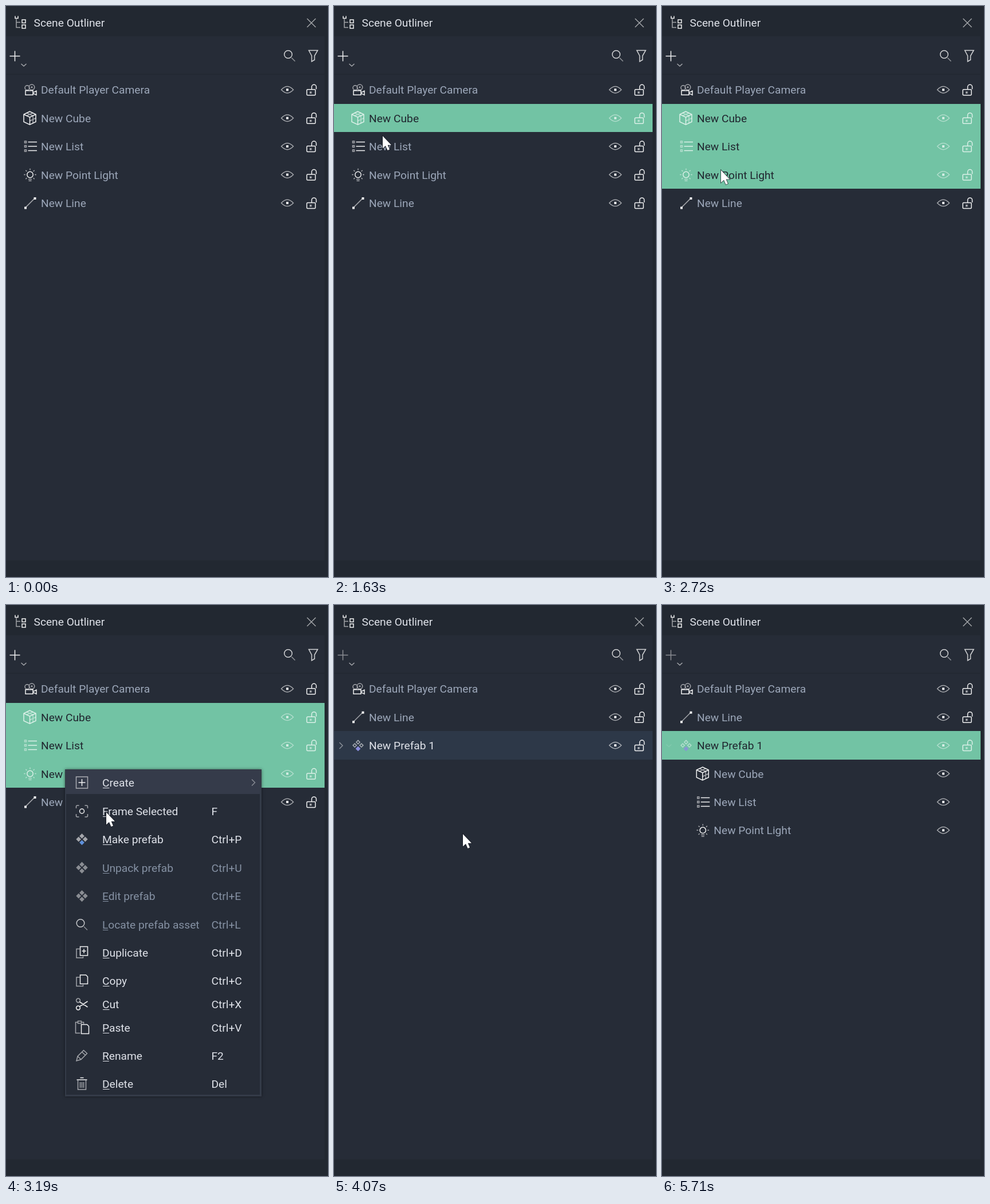
Write an HTML page with a canvas that moves like this. It is 562x997 px and loops after 5880 ms.

```html
<!DOCTYPE html>
<html lang="en">
<head>
<meta charset="utf-8">
<title>Scene Outliner</title>
<style>
html, body { margin: 0; width: 100%; height: 100%; overflow: hidden; background: #222831; }
canvas { display: block; width: 562px; height: 997px; }
</style>
</head>
<body>
<canvas id="stage" width="562" height="997"></canvas>
<script>
const ctx = document.getElementById('stage').getContext('2d');
const LOOP = 5880;
const FONT = '19.2px Roboto, sans-serif';
const PANEL = '#262c37', HOVER = '#353b4a', PICKED = '#72c3a4', FOCUS = '#2d3848';
const BRIGHT = '#dfe2e9', DIM = '#9ca7b9', OFF = '#8591a3', DARK = '#20262f';
const WHITE = 'rgba(255,255,255,.93)', GREY = 'rgba(255,255,255,.58)';

const circle = (x, y, r) => `M${x - r} ${y}a${r} ${r} 0 1 0 ${2 * r} 0a${r} ${r} 0 1 0 ${-2 * r} 0Z`;
const box = (x, y, w, h) => `M${x} ${y}h${w}v${h}h${-w}Z`;
const diamond = (x, y, r) => `M${x} ${y - r}l${r} ${r}l${-r} ${r}l${-r} ${-r}Z`;
const rays = [0, 45, 135, 180, 225, 270, 315].map(a => {
  const c = Math.cos(a * Math.PI / 180), s = Math.sin(a * Math.PI / 180);
  return `M${c * 8} ${s * 8}L${c * 10.8} ${s * 10.8}`;
}).join('');
const prefabTop = r => diamond(0, -5.6, r) + diamond(-5.8, 0, r) + diamond(5.8, 0, r);

// Paths relative to the icon centre: grey/white strokes, greyFill/whiteFill areas, tint
const ICONS = {
  tree: { grey: 'M-7-6V9H0M-7 0H0', white: 'M-9-11V-7H-4V-11' + box(3, -4.5, 6, 5.5) + box(3, 4.5, 6, 6) },
  close: { grey: 'M-7.5-7.5L7.5 7.5M7.5-7.5L-7.5 7.5' },
  plus: { white: 'M-9 0H9M0-9V9' },
  down: { grey: 'M-4.5-2L0 2L4.5-2' },
  right: { grey: 'M-2.5-5.5L3 0L-2.5 5.5' },
  search: { white: circle(-2.5, -2, 6.8), grey: 'M3.5 4L9.5 10' },
  filter: { white: 'M-7.5-9.5H8L2.5 0V7L-2.5 10V0Z' },
  camera: {
    grey: circle(-5, -3.5, 4) + circle(3, -4.5, 4.8) + circle(3, -4.5, .8),
    white: box(-8, 1.5, 13, 7.5) + 'M5 5L11 2V9L5 6'
  },
  cube: {
    white: 'M-.5-11.5L10-6.5V6.5L-.5 11.5L-11 6.5V-6.5ZM-11-6.5L-.5-1.5L10-6.5M-.5-1.5V11.5',
    grey: 'M-6-9L5-4V9M5-9L-6-4M-.5 5L10 0'
  },
  list: {
    white: 'M-3.5-7.5H12M-3.5 0H12M-3.5 7.5H12',
    grey: [-7.5, 0, 7.5].map(y => box(-9.5, y - 1.5, 3, 3)).join('')
  },
  light: { white: circle(0, 0, 5.2), grey: rays + 'M-3 8H3M-2.5 10.7H2.5' },
  line: { grey: 'M-8 8L8-8', whiteFill: box(-10, 6.5, 4, 4) + box(6.5, -10, 4, 4) },
  prefab: { grey: prefabTop(3.1), tintFill: diamond(0, 5.8, 4.4), tint: '#8b8ddd' },
  eye: { grey: 'M-10.5 0Q-5-5.7 0-5.7T10.5 0Q5 5.7 0 5.7T-10.5 0Z', whiteFill: box(-2, -2, 4, 4) },
  lock: { white: 'M-7-.5H5.5Q7-.5 7 1V8Q7 9.5 5.5 9.5H-6.5Q-8 9.5-8 8V1Q-8-.5-6.5-.5M.5-.5V-5a4 4 0 0 1 8 0V-1', greyFill: box(-3, 3, 3.5, 3.5) },
  create: { grey: box(-10, -10, 20, 20), white: 'M-6 0H6M0-6V6' },
  frame: { grey: 'M-10-5V-8Q-10-10-8-10H-5M5-10H8Q10-10 10-8V-5M10 5V8Q10 10 8 10H5M-5 10H-8Q-10 10-10 8V5', white: circle(0, 0, 4) },
  make: { greyFill: prefabTop(4.4), tintFill: diamond(0, 5.8, 4.4), tint: '#5f90db' },
  dots: { greyFill: prefabTop(4.4) + diamond(0, 5.8, 4.4) },
  duplicate: { grey: 'M-4-6H-9.5V9.5H2V7', white: box(-3, -10, 13, 15.5) + 'M0-2.2H7M3.5-6V1.5' },
  copy: { grey: 'M-4-6H-9.5V9.5H2V7', white: 'M-3-10H7L10-7V5.5H-3Z' },
  cut: { grey: circle(-6.5, -6.5, 3.4), white: circle(-6.5, 6.5, 3.4) + 'M-4 4L10-5M-4-4L10 5' },
  paste: { grey: 'M-3 10H-11V-9H-7M-1-9H3V-6' + box(-7, -11, 6, 4), white: 'M-1-5H9L12-2V11H-1Z' },
  rename: { grey: 'M-9.5 9.5L-7.5 1.5L3-9L9-3.5L-1.5 7Z M-7.5 1.5L-1.5 7M0-6L6-.5' },
  trash: { grey: 'M-7-6V10H7V-6M-3-3V7M0-3V7M3-3V7', white: 'M-9-7H9M-3-10.5H3' }
};

// Every visible change falls on one of these moments
const STEPS = [0, 180, 335, 490, 650, 805, 960, 1170, 1320, 1480, 1630, 1810, 1970, 2120, 2280,
  2460, 2600, 2750, 2900, 3040, 3190, 3400, 3590, 3750, 3910, 4070, 4210, 4400, 4600,
  4780, 4970, 5150, 5340, 5520, 5710];

// Pointer path: time, x, y
const PATH = [[180, 235, 610], [490, 175, 470], [805, 98, 288], [960, 86, 222], [1170, 84, 200],
  [1480, 84, 200], [1630, 85, 227], [1810, 88, 243], [2120, 90, 246], [2280, 103, 286],
  [2750, 103, 287], [3040, 150, 330], [3190, 175, 362], [3400, 195, 394], [3750, 203, 403],
  [4070, 225, 400], [4400, 70, 270], [4600, 11, 241], [4970, 15, 247], [5520, 190, 782]];

const ROWS = [['camera', 'Default Player Camera'], ['cube', 'New Cube'], ['list', 'New List'],
  ['light', 'New Point Light'], ['line', 'New Line']];
const GROUPED = [ROWS[0], ROWS[4], ['prefab', 'New Prefab 1']];
const MENU = [
  ['create', 'Create', '', 310], ['frame', 'Frame Selected', 'F', 360], ['make', 'Make prefab', 'Ctrl+P', 409],
  ['dots', 'Unpack prefab', 'Ctrl+U', 458.5], ['dots', 'Edit prefab', 'Ctrl+E', 508],
  ['search', 'Locate prefab asset', 'Ctrl+L', 557.5], ['duplicate', 'Duplicate', 'Ctrl+D', 606.5],
  ['copy', 'Copy', 'Ctrl+C', 656], ['cut', 'Cut', 'Ctrl+X', 697], ['paste', 'Paste', 'Ctrl+V', 737.5],
  ['rename', 'Rename', 'F2', 786.5], ['trash', 'Delete', 'Del', 836]
];

// Last value whose start time has been reached
const latest = (t, pairs) => pairs.reduce((v, [start, value]) => t >= start ? value : v, -1);

function rect(color, x, y, w, h) {
  ctx.fillStyle = color;
  ctx.fillRect(x, y, w, h);
}

function text(str, x, cy, color) {
  ctx.fillStyle = color;
  ctx.fillText(str, x, Math.round(cy + 7));
}

function icon(name, x, y, alpha = 1) {
  const { grey, white, greyFill, whiteFill, tintFill, tint } = ICONS[name];
  const stroke = (d, color) => { if (d) { ctx.strokeStyle = color; ctx.stroke(new Path2D(d)); } };
  const fill = (d, color) => { if (d) { ctx.fillStyle = color; ctx.fill(new Path2D(d)); } };
  ctx.save();
  ctx.translate(x, y);
  ctx.globalAlpha = alpha;
  ctx.lineWidth = 1.5;
  stroke(grey, GREY);
  stroke(white, WHITE);
  fill(greyFill, GREY);
  fill(whiteFill, WHITE);
  fill(tintFill, tint);
  ctx.restore();
}

function row(i, [name, label], { back, indent = 0, lock = true }) {
  const y = 146.3 + 49.4 * i, picked = back === PICKED, alpha = picked ? .8 : 1;
  const top = Math.round(y - 24.7), bottom = Math.round(y + 24.7);
  if (back) rect(back, 0, top, 556, bottom - top);
  icon(name, 42 + indent, y, alpha);
  text(label, 61 + indent, y, picked ? DARK : back ? BRIGHT : DIM);
  icon('eye', 491, y, picked ? .75 : 1);
  if (lock) icon('lock', 533, y, alpha);
}

function chrome(dimPlus) {
  rect('#222831', 0, 0, 562, 997);
  rect(PANEL, 0, 53, 556, 915);
  rect('#222831', 0, 118.5, 556, 1.5);
  icon('tree', 25, 28.5);
  text('Scene Outliner', 48.5, 29, BRIGHT);
  icon('close', 533, 29.5);
  icon('plus', 15.5, 87.5, dimPlus ? .5 : 1);
  icon('down', 31, 103);
  icon('search', 495, 86.5, .85);
  icon('filter', 536, 87, .85);
}

function menu(active) {
  ctx.save();
  ctx.shadowColor = 'rgba(0,0,0,.5)';
  ctx.shadowBlur = 5;
  rect('#343b48', 103, 287, 343, 571);
  ctx.restore();
  rect(PANEL, 105, 290, 338, 565);
  MENU.forEach(([name, label, key, y], i) => {
    const off = i > 2 && i < 6, color = off ? OFF : BRIGHT;
    if (i === active) rect(HOVER, 105, y - 20, 338, 40);
    icon(name, 132.5, y, off ? .8 : 1);
    text(label, 168, y, color);
    rect(color, 169, Math.round(y + 9), ctx.measureText(label[0]).width - 1, 1);
    text(key, 358.5, y, color);
  });
  icon('right', 431.5, 310, .7);
}

function pointer(t) {
  const next = PATH.findIndex(p => p[0] >= t);
  if (t < PATH[0][0] || next < 0) return;
  const [t1, x1, y1] = PATH[next], [t0, x0, y0] = PATH[Math.max(0, next - 1)];
  const k = t1 > t0 ? (t - t0) / (t1 - t0) : 1;
  ctx.save();
  ctx.translate(x0 + (x1 - x0) * k, y0 + (y1 - y0) * k);
  const shape = new Path2D('M0 0V21.5L5 17L8.5 25L12 23.5L8.7 15.8H15Z');
  ctx.strokeStyle = 'rgba(20,24,32,.8)';
  ctx.lineWidth = 1.6;
  ctx.stroke(shape);
  ctx.fillStyle = '#fff';
  ctx.fill(shape);
  ctx.restore();
}

function draw(now) {
  const time = now % LOOP;
  const t = STEPS.filter(s => s <= time).pop();
  const grouped = t >= 3910, open = t >= 4780;
  ctx.font = FONT;
  chrome(grouped);
  if (grouped) {
    GROUPED.forEach((r, i) => row(i, r, { back: i === 2 && (open ? PICKED : FOCUS) }));
    icon(open ? 'down' : 'right', 12, 245.5, open ? .2 : .75);
    if (open) ROWS.slice(1, 4).forEach((r, i) => row(i + 3, r, { indent: 29.3, lock: false }));
  } else {
    const picked = latest(t, [[0, 0], [1480, 1], [1970, 2], [2460, 3]]);
    const hover = latest(t, [[650, 4], [805, 3], [1170, 1], [1630, -1], [1810, 2], [2280, 3]]);
    ROWS.forEach((r, i) => row(i, r, { back: i && i <= picked ? PICKED : i === hover && HOVER }));
    if (t >= 2750) menu(latest(t, [[2900, 0], [3400, 1], [3590, 2]]));
  }
  pointer(t);
  requestAnimationFrame(() => draw(performance.now() - start));
}

const start = performance.now();
draw(0);
</script>
</body>
</html>
```
